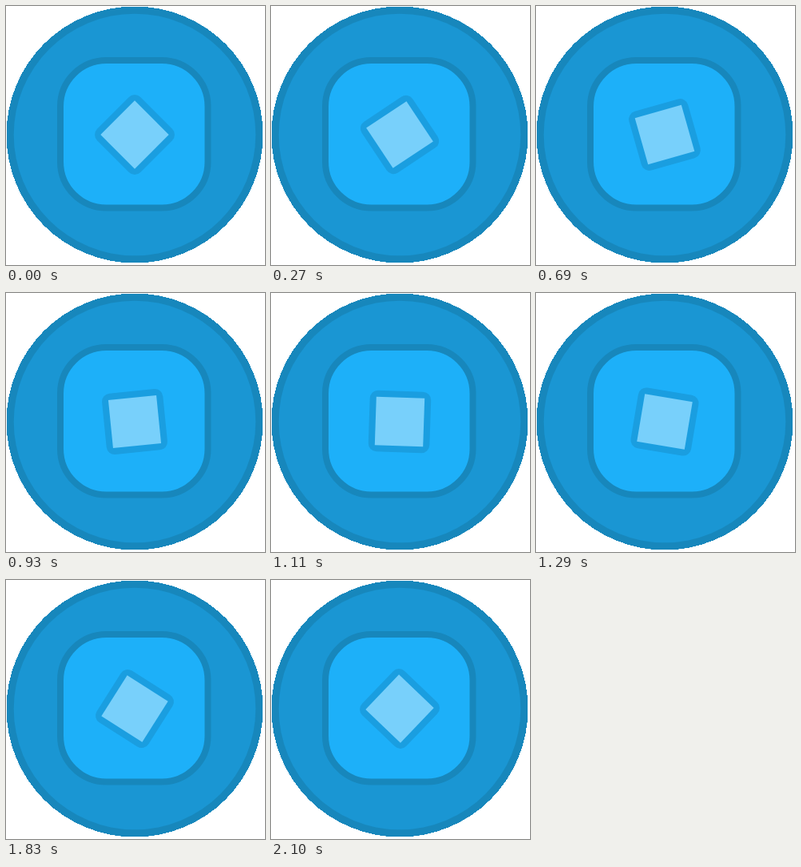
An HTML page that plays this animation: 324 by 324 pixels, repeating every 2130 ms.

```html
<!DOCTYPE html>
<html lang="en">
<head>
<meta charset="utf-8">
<title>Turning diamond</title>
<style>
  html, body { margin: 0; width: 100%; height: 100%; overflow: hidden; background: #fff; }
  svg { display: block; width: 100vw; height: 100vh; }
  .disc-rim { fill: #1787bc; filter: url(#hard-edge); }
  .disc { fill: #1a96d3; }
  .tile { fill: #1db0f9; stroke: #1787bc; stroke-width: 8; }
  .gem-rim { fill: #1a9ee0; }
  .gem { fill: #78d0fb; }
</style>
</head>
<body>
<svg viewBox="0 0 324 324">
  <!-- Every pixel the shape touches becomes fully opaque -->
  <filter id="hard-edge" color-interpolation-filters="sRGB">
    <feComponentTransfer in="SourceAlpha" result="mask">
      <feFuncA type="linear" slope="60"/>
    </feComponentTransfer>
    <feFlood flood-color="#1787bc"/>
    <feComposite in2="mask" operator="in"/>
  </filter>
  <g transform="translate(161 161)">
    <circle class="disc-rim" r="160"/>
    <circle class="disc" r="151.3"/>
    <rect class="tile" x="-93" y="-93" width="184.5" height="184.5" rx="57.5"/>
    <g id="gem" transform="rotate(-45)">
      <rect class="gem-rim" x="-38.3" y="-38.3" width="76.6" height="76.6" rx="10.2"/>
      <rect class="gem" x="-30.2" y="-30.2" width="60.4" height="60.4"/>
    </g>
  </g>
</svg>
<script>
  const STEP = 30, STEPS = 71;
  const gem = document.getElementById("gem");
  const start = performance.now();

  // A quarter turn per loop, in even steps
  function draw() {
    const elapsed = Math.max(0, performance.now() - start);
    const step = Math.floor(elapsed / STEP) % STEPS;
    gem.setAttribute("transform", `rotate(${-45 + 90 * step / STEPS})`);
    requestAnimationFrame(draw);
  }
  draw();
</script>
</body>
</html>
```
